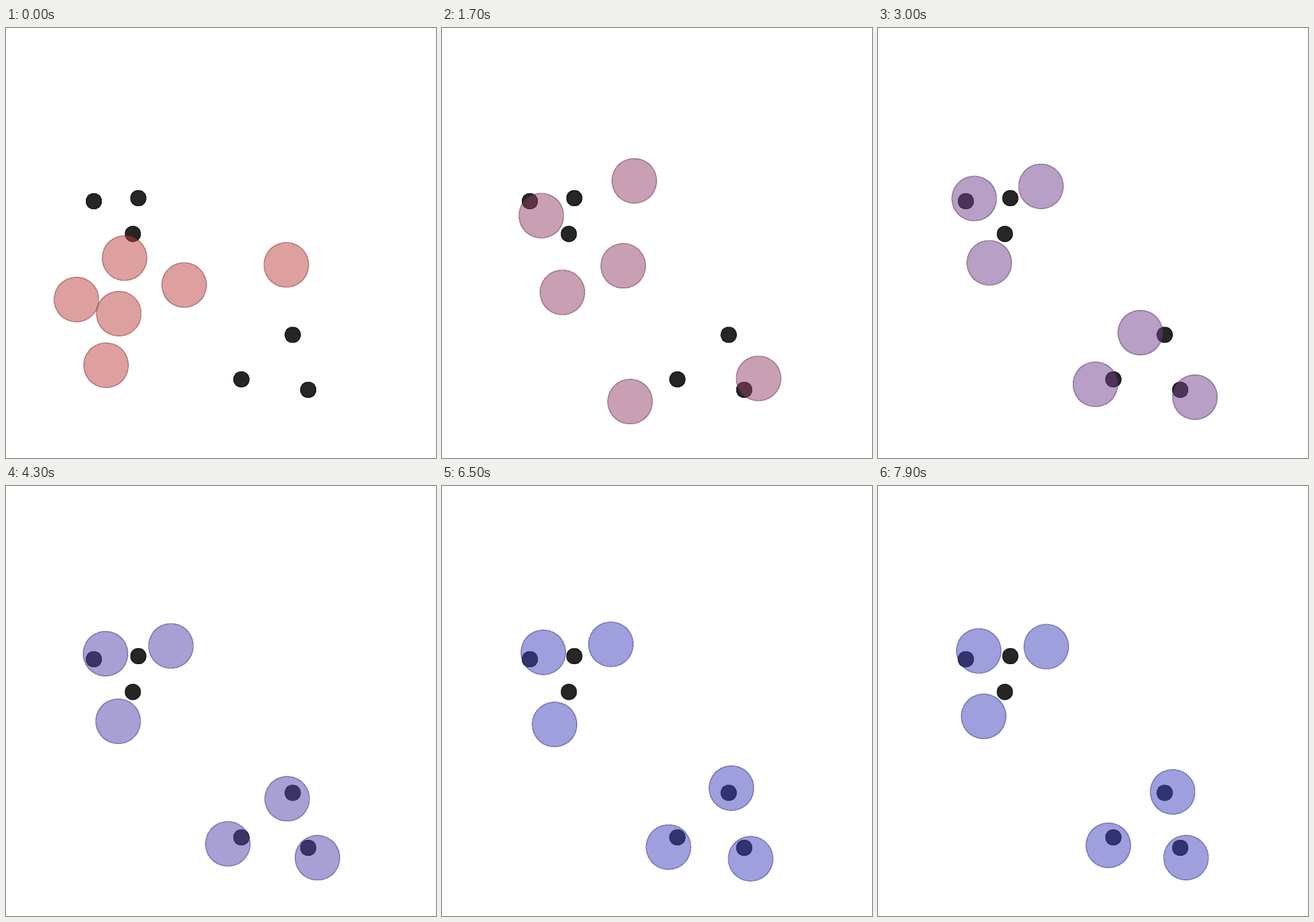
Write a matplotlib script that moves like this. It is 700 by 700 pixels and loops after 8000 ms.

```python
import numpy as np
import matplotlib.pyplot as plt
from matplotlib.animation import FuncAnimation
from matplotlib.patches import Circle

SIZE, DPI = 700, 100
FRAMES, INTERVAL = 80, 100
FADE_STEPS = 50
AGENT_R, MARK_R = 36.3, 12.4
THRUST = 2.8

RED = np.array([0.75, 0.25, 0.25])
BLUE = np.array([0.25, 0.25, 0.75])
DARK = np.full(3, 0.15)

LANDMARKS = [(143, 282), (215.4, 277), (206.5, 335.2),
             (466.7, 499.5), (383.2, 572), (492, 589)]

# Steps at which every agent passes its next waypoint.
STEPS = np.array([0, 7, 17, 30, 43, FRAMES - 1])


def spline(points, kick=None):
    """Smooth track through the waypoints, leaving with velocity `kick`."""
    p, h = np.array(points), np.diff(STEPS)[:, None]
    rate = np.diff(p, axis=0) / h
    w = 1 / h[:, 0]
    # Continuous acceleration at every waypoint, none at the end.
    system = np.diag(2 * (np.r_[0, w] + np.r_[w, 0])) + np.diag(w, 1) + np.diag(w, -1)
    force = 3 * rate / h
    rhs = np.vstack([force[:1], force[:-1] + force[1:], force[-1:]])
    system[0] = np.eye(len(p))[0]
    rhs[0] = THRUST * np.sign(rate[0]) if kick is None else kick
    v = np.linalg.solve(system, rhs)

    n = np.arange(FRAMES)
    i = np.clip(np.searchsorted(STEPS, n, side="right") - 1, 0, len(h) - 1)
    u, h = (n[:, None] - STEPS[i][:, None]) / h[i], h[i]
    return ((1 - u) ** 2 * ((1 + 2 * u) * p[i] + u * h * v[i])
            + u ** 2 * ((3 - 2 * u) * p[i + 1] - (1 - u) * h * v[i + 1]))


tracks = [
    spline([(193, 374.6), (183.3, 346), (161.7, 305.5),
            (156.7, 277.6), (162, 273), (164, 268.5)]),
    spline([(114.7, 442), (115.8, 393), (196, 430.4),
            (181.2, 382.3), (182.6, 383), (172, 375)], kick=(-10, -5)),
    spline([(183.7, 465), (190.2, 476.2), (295, 387.2),
            (427, 496), (457.7, 509.2), (479.7, 498)], kick=(7, 4)),
    spline([(162.9, 549), (212.1, 597.5), (306.2, 608.2),
            (353.9, 580), (361.1, 582.6), (375, 585)]),
    spline([(290, 418.4), (436.2, 483), (515.3, 570.4),
            (516, 601), (507, 605.2), (501.5, 605)], kick=(33, 15)),
    spline([(456.3, 385.6), (407.3, 336.7), (313, 248.8),
            (265.3, 257.8), (268.5, 260.4), (274, 261.5)]),
]

fig = plt.figure(figsize=(SIZE / DPI, SIZE / DPI), dpi=DPI, facecolor="white")
ax = fig.add_axes([0, 0, 1, 1])
ax.set(xlim=(0, SIZE), ylim=(SIZE, 0))
ax.axis("off")


def disc(center, radius, layer):
    return ax.add_patch(Circle(center, radius, lw=72 / DPI,
                               antialiased=False, zorder=layer))


def paint(patch, color, alpha):
    patch.set_facecolor((*color, alpha))
    patch.set_edgecolor((*color / 2, alpha / 2))


for spot in LANDMARKS:
    paint(disc(spot, MARK_R, 1), DARK, 1)
agents = [disc(track[0], AGENT_R, 2) for track in tracks]


def update(n):
    color = RED + (BLUE - RED) * min(n / FADE_STEPS, 1)
    for agent, track in zip(agents, tracks):
        agent.center = track[n]
        paint(agent, color, 0.5)
    return agents


anim = FuncAnimation(fig, update, frames=FRAMES, interval=INTERVAL,
                     repeat=True, repeat_delay=0)
plt.show()
```
